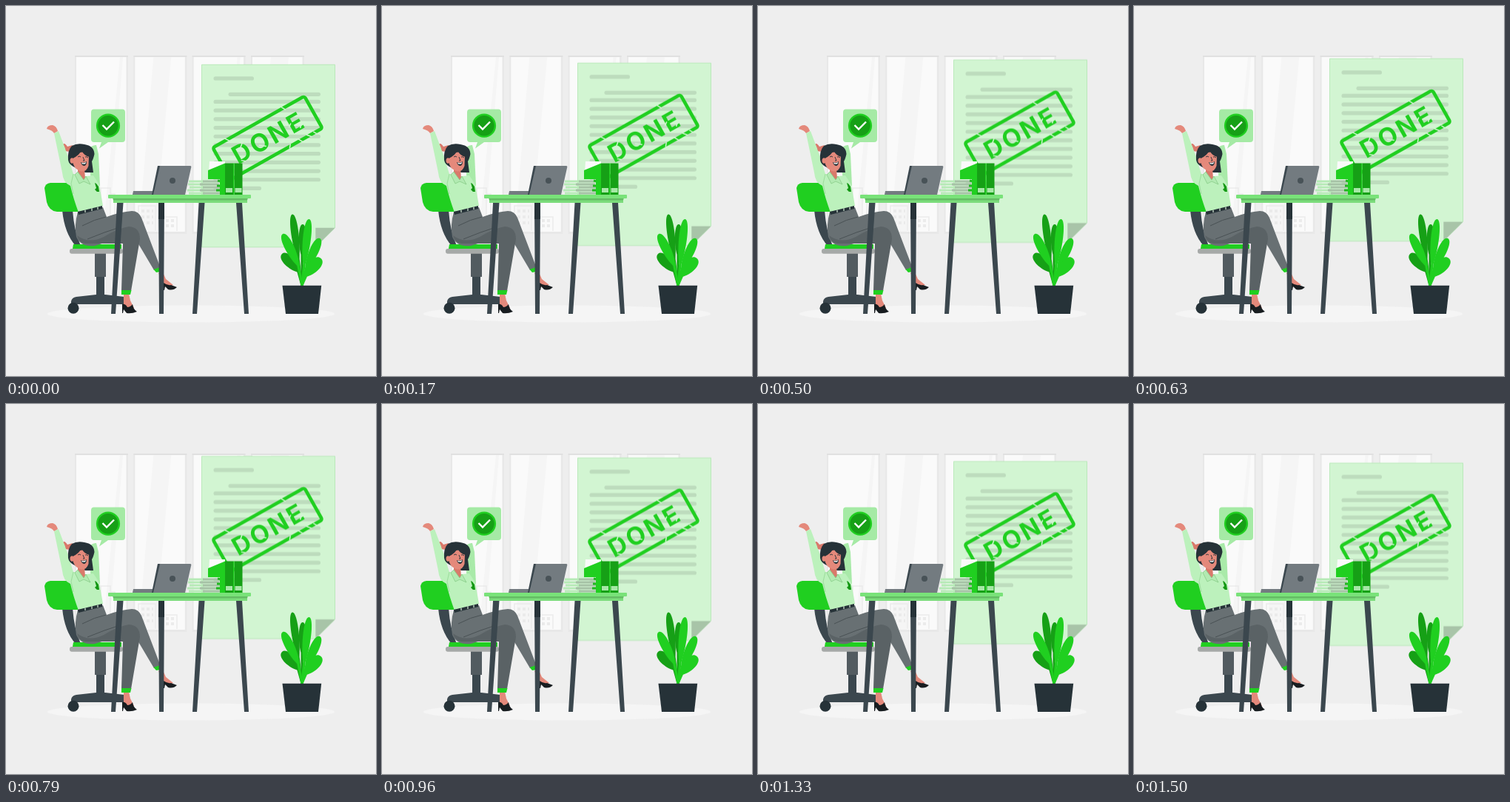
An HTML page that plays this animation: 500x500 px, repeating every 1540 ms.

```html
<!DOCTYPE html>
<html lang="en">
<head>
<meta charset="utf-8">
<title>Done</title>
<style>
  html, body { margin: 0; width: 100%; height: 100%; overflow: hidden; background: #eee; }
  svg { display: block; width: 100vw; height: 100vh; }
  .stamp text { font: 700 33.5px Inter, "Open Sans", sans-serif; letter-spacing: 3px; text-anchor: middle; }
</style>
</head>
<body>
<svg viewBox="0 0 500 500">
  <rect width="500" height="500" fill="#eee"/>
  <ellipse cx="250" cy="416" rx="194" ry="11.5" fill="#f5f5f5"/>

  <g id="windows"></g>
  <g fill="none" stroke="#ebebeb" stroke-width="1.5">
    <path d="M128 304V246H141V304M147 304V254H141M179 304V270H202V304M205 304V285H231V304"/>
    <path d="M183 277H199M183 285H199M183 293H199M209 290H229M209 297H229" stroke-width="4" stroke-dasharray="4 3"/>
  </g>

  <g id="paper">
    <path d="M264.5 79.8H444.5V300.4L418.3 326.4H264.5Z" fill="#d2f5d2" stroke="#a9e4a9" stroke-width=".7"/>
    <path d="M418.3 300.4H444.5L418.3 326.4Z" fill="#a8c4a8"/>
    <g id="bars" fill="#bddcbd"></g>
    <g class="stamp" transform="translate(353.5 178.8) rotate(-29.3)" fill="#20cf20">
      <rect x="-71" y="-24.8" width="142" height="49.6" rx="3" fill="none" stroke="#20cf20" stroke-width="4.6"/>
      <text x="1.5" y="12.2">DONE</text>
      <path d="M-51 -28L-47 -22M36 -28L40 -21M39 28L35 21M19 27L23 22M48 22L53 28M58 23L61 28M-39 -6L-32 -12M-46 9L-41 13M-15 3L-7 9M13 10L17 13M32 2L37 -2M45 10L50 5" stroke="#d2f5d2" stroke-width="1.5" fill="none"/>
    </g>
  </g>

  <!-- chair -->
  <path d="M76 276H90Q92 304 101 324H94Q79 307 76 276Z" fill="#3b474e"/>
  <path d="M52 246Q53 240 60 239H91L99 278H69Q58 277 55 265Z" fill="#20cf20"/>
  <path d="M120 334H135V366H120Z" fill="#525b60"/>
  <path d="M122 366H133V393H122Z" fill="#3b474e"/>
  <path d="M88 403V399Q89 394 95 393L122 390H134L160 393Q166 395 166 403Z" fill="#3b474e"/>
  <circle cx="91" cy="408.3" r="7.5" fill="#263238"/>
  <rect x="86" y="328" width="72" height="6.7" rx="3" fill="#a6a9a8"/>
  <path d="M91 322H156V328H90Z" fill="#20cf20"/>

  <!-- raised arms -->
  <path d="M87 197L79 196Q81 192 77 187Q79 184 83 190L90 188Z" fill="#d9796b"/>
  <path d="M111 194Q117 187 122 188L125 200L127 243L115 238Z" fill="#a9eaa9"/>
  <path d="M55 166Q56 161 63 161Q68 162 70 169L65 172Q63 168 55 166Z" fill="#e4897b"/>
  <path d="M65 172L71 169L83 201L91 227L99 227L107 230L118 229L126 241L131 270L98 279Q91 260 87 243Q77 239 76 225Z" fill="#bcf1bc"/>
  <path d="M91 227L88 240L91 254" fill="none" stroke="#9bdc9b"/>
  <path d="M120 239L122 246L120 248L123 251H126L125 244L122 240Z" fill="#149814"/>

  <!-- head -->
  <path d="M84 208Q83 195 89 189Q96 185 106 187Q119 189 119.500 200Q118 207 116 210L118 225H107L91 217Q85 214 84 208Z" fill="#263238"/>
  <path d="M97 220H106L107 233L104 237L97 228Z" fill="#d9796b"/>
  <path d="M91 206Q92 199 99 198Q110 196 112 203L111.500 216Q109 224 102 223.500Q94 222 91 214Z" fill="#e4897b"/>
  <ellipse cx="89.500" cy="209" rx="3" ry="3.700" fill="#e4897b"/>
  <path d="M90 206Q99 202 102 195Q106 203 113 204V193L96 190Z" fill="#263238"/>
  <path d="M97 204Q99 202 101 204M107 204Q109 203 111 205M104 204L106 209H104" fill="none" stroke="#263238" stroke-width=".9"/>
  <path d="M101 211Q105 213 109 210Q109 216 105 216Q102 215 101 211Z" fill="#263238"/>
  <path d="M102 211.500Q105 213 108.500 211L107 213.500H103Z" fill="#fff"/>
  <path d="M93 228L97 224L105 235L108 230L114 241L105 237L99 240Z" fill="#b2eab2" stroke="#81c781" stroke-width=".7"/>

  <!-- legs -->
  <path d="M212 360L216 369L226 377L216 380L212 371L206 361Z" fill="#e4897b"/>
  <path d="M213 374Q218 378 223 377L231 380Q226 385 219 383L215 379L214 384H213Z" fill="#181d20"/>
  <path d="M97 278L131 272L136 285Q155 278 170 277Q179 277 183 286L208.500 353L200 357L171 308L120 324Q101 326 95 312Q92 296 97 278Z" fill="#687073"/>
  <path d="M199.500 356L208 353L209 359L203 360Z" fill="#20cf20"/>
  <path d="M96 310Q112 322 132 312Q152 300 166 298Q181 299 181 315L169 385H156L158 321H108Q98 320 96 310Z" fill="#5a6265"/>
  <path d="M103 297Q120 288 135 285M110 315Q134 305 154 299" fill="none" stroke="#495154" stroke-width="1"/>
  <path d="M97 278L130 270V274L98 282Z" fill="#263238"/>
  <path d="M107 275.500V279M116 273.300V277M124 271.500V275" stroke="#d4e8d4" stroke-width="1.200"/>
  <path d="M159 389H166L168 398L173 408L163 410L159 403Z" fill="#e4897b"/>
  <path d="M156 384H169.500L168 390H156Z" fill="#20cf20"/>
  <path d="M157 403Q161 402 164 407Q168 407 171 403Q172 410 177 413Q170 416 163 415L159 410L158 415H157Z" fill="#181d20"/>

  <!-- desk -->
  <path d="M150 266H158.500L148 416H142ZM206 266H214L213 416H207ZM260.500 266H268.500L258 416H252ZM311 266H319L328 416H322Z" fill="#3b474e"/>
  <path d="M206 266H214V288H206Z" fill="#263238"/>
  <path d="M144 259H327L325 266H146Z" fill="#64bd64"/>
  <rect x="138" y="255" width="193" height="5" rx="1" fill="#79e279"/>
  <path d="M145 262.500H326V266H145Z" fill="#7bdc7b"/>

  <!-- laptop -->
  <path d="M172 250H201L198 255H171Z" fill="#737b80"/>
  <path d="M205 216H247L236 255H197Z" fill="#3b474e"/>
  <path d="M208 216H249Q251 216 250 219L242 255H199Z" fill="#737b80"/>
  <circle cx="225" cy="236" r="4" fill="#485257"/>

  <!-- papers and binders -->
  <g fill="none" stroke-width="3">
    <path d="M247 237H267M246 241H266M248 245H267M245 249H268M247 253H269" stroke="#b6eab6"/>
    <path d="M266 237H290M262 241H288M266 245H291M262 249H290M266 253H289" stroke="#a6c2a6"/>
    <path d="M286 236L292 237M285 243L292 243M284 249L291 249" stroke="#20b820"/>
  </g>
  <path d="M275 210H296V214L274 224Z" fill="#fafafa"/>
  <path d="M273 222L296 212.500V255H289V234H273Z" fill="#20cf20"/>
  <path d="M296 212.500H307V255H296ZM308.500 212.500H319.500V255H308.500Z" fill="#16a016"/>
  <path d="M307 212.500H308.500V255H307Z" fill="#20cf20"/>
  <path d="M297 246H306V252H297ZM309.500 246H318.500V252H309.500Z" fill="#a6e8a6"/>

  <!-- speech bubble -->
  <path d="M119 139.500H157Q161 139.500 161 143.500V180Q161 184 157 184H138L126 192.500L129 184H119Q115 184 115 180V143.500Q115 139.500 119 139.500Z" fill="#a5eaa5"/>
  <circle cx="138" cy="161.700" r="14.900" fill="#16a016" stroke="#20cf20" stroke-width="2.400"/>
  <path d="M130.500 161L136 166.500L146 156.500" fill="none" stroke="#fff" stroke-width="2.400"/>

  <g id="plant"></g>
  <path d="M373.500 377.700H426.200L422 416H378Z" fill="#263238"/>
</svg>
<script>
  const $ = id => document.getElementById(id);

  $('windows').innerHTML = [95, 174.3, 253.6, 333].map((x, i) => {
    const glare = i % 2 ? [25, 49, 27, 5] : [59, 63, 44, 36];
    const [a, b, c, d] = glare.map(n => n + x);
    return `<path d="M${x - 2} 67H${x + 70}V308H${x - 2}Z" fill="#e8e8e8"/>
      <path d="M${x} 69H${x + 67.5}V305H${x}Z" fill="#fafafa"/>
      <path d="M${a} 69H${b}L${c} 305H${d}Z" fill="#f5f5f5"/>
      <path d="M${x - 2} 68H${x + 70}" stroke="#dedede" stroke-width="1.5"/>`;
  }).join('');

  const bar = (x, y, end) => `<rect x="${x}" y="${y - 2.6}" width="${end - x}" height="5.2" rx="2.6"/>`;
  let bars = bar(280.5, 98.5, 335) + bar(300.5, 119.9, 425);
  for (let i = 0; i < 11; i++) bars += bar(280.5, 130 + i * 11.7, i < 10 ? 425 : 345);
  $('bars').innerHTML = bars;

  // Club-shaped leaf from its tip to a narrow neck, then a stalk down to the pot
  const leaf = (tx, ty, nx, ny, w, fill) => {
    const dx = nx - tx, dy = ny - ty, len = Math.hypot(dx, dy);
    const side = s => {
      const px = -dy / len * w * s, py = dx / len * w * s;
      const p = (k, m) => `${tx + dx * k + px * m} ${ty + dy * k + py * m}`;
      return [p(0, 1), p(.6, 1), p(1, .25)];
    };
    const [a, b, c] = side(1), [d, e, f] = side(-1);
    return `<path d="M${tx} ${ty}C${a} ${b} ${c}L398.5 378H401.5L${f}C${e} ${d} ${tx} ${ty}Z" fill="${fill}"/>`;
  };
  const light = '#20cf20', dark = '#16a016';
  $('plant').innerHTML = [
    [387, 281.5, 395, 342, 6.5, dark],
    [401, 295, 400, 336, 6, dark],
    [373, 335, 395, 358, 9, dark],
    [374, 308, 395, 350, 8, light],
    [409.5, 288, 403, 348, 7, light],
    [424, 314, 406, 354, 8, light],
    [425.5, 341, 405, 364, 10, light]
  ].map(a => leaf(...a)).join('');

  // Steady float: up for one half, down for the other
  const at = (y, offset) => ({ transform: `translateY(${y}px)`, offset });
  $('paper').animate(
    [at(-.52, 0), at(-10, 730 / 1540), at(0, 1500 / 1540), at(-.52, 1)],
    { duration: 1540, iterations: Infinity, easing: 'linear' }
  );
</script>
</body>
</html>
```
